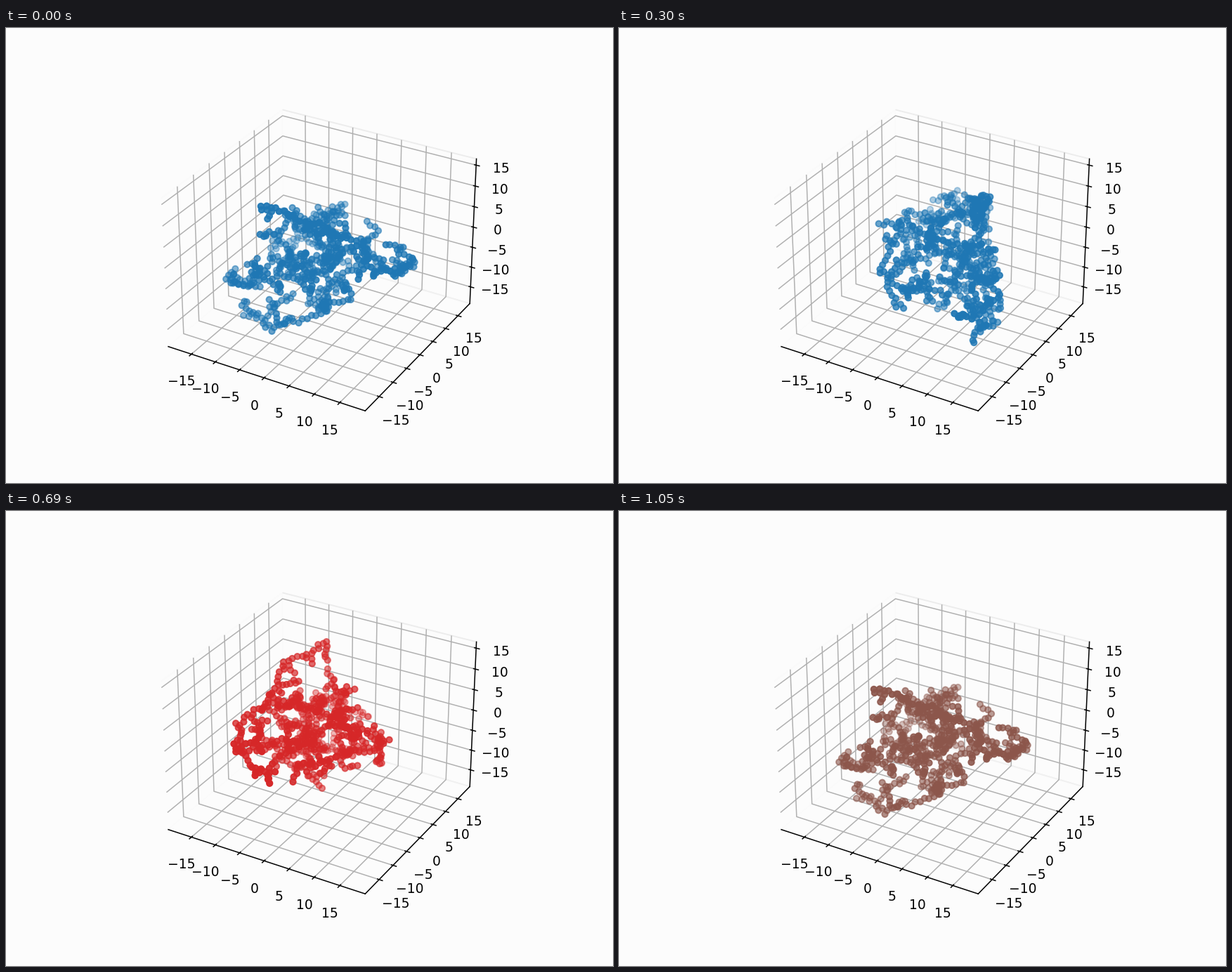
A matplotlib script for the animation above (1.08 s loop, 864 by 648 pixels).

```python
import matplotlib.pyplot as plt
import numpy as np
from matplotlib.animation import ArtistAnimation

FRAMES, LOOP_MS, COUNT = 36, 1080, 640
BG = "#fcfcfc"

# Ends of the main branches; they span the cluster's hull
TIPS = np.array([
    (-11, -6, 14), (-4, -9, 12), (-17, -2, -6), (16, 0, -4),
    (-9, -10, -14), (-14, -4, -14), (1, -9, -10), (9, -12, 1),
    (-5, 11, -1), (-6, 8, -9), (0, 0, -15), (16, -7, 3),
    (-14, -9, -3), (5, -8, 8), (4, 9, 5), (-5, 2, 9),
])


def unit(v):
    return v / np.linalg.norm(v)


def branch(points, target, rng):
    """Walk in jittered unit steps from the nearest point to the target."""
    dist = np.linalg.norm(np.array(points) - target, axis=1)
    pos, gap = points[dist.argmin()], dist.min()
    if gap < 1.4:
        return
    while gap > 1:
        pos = pos + unit(unit(target - pos) + rng.normal(0, 0.4, 3))
        points.append(pos)
        gap = np.linalg.norm(target - pos)


def grow(rng):
    points = [np.zeros(3)]
    for tip in sorted(TIPS, key=np.linalg.norm):
        branch(points, tip, rng)
    while len(points) < COUNT:
        corners = TIPS[rng.choice(len(TIPS), 3, replace=False)]
        branch(points, rng.dirichlet([0.8] * 3) @ corners, rng)
    return np.array(points)


def turn(points, angle):
    x, y, z = points.T
    c, s = np.cos(angle), np.sin(angle)
    return x * c - y * s, x * s + y * c, z


fig = plt.figure(figsize=(6.4, 4.8), dpi=135, facecolor=BG)
ax = fig.add_subplot(projection="3d", facecolor=BG)

cluster = grow(np.random.default_rng(12))
angles = np.radians(30) + np.linspace(0, 2 * np.pi, FRAMES)
artists = [[ax.scatter(*turn(cluster, a), color=f"C{i % 10}")]
           for i, a in enumerate(angles)]

ax.set(xlim=(-19.9, 19.9), ylim=(-19.9, 19.9), zlim=(-19.28, 16.48))
for axis, edge in ((ax.xaxis, "#fafafa"), (ax.yaxis, "#ececec"),
                   (ax.zaxis, "#f1f1f1")):
    axis.set_pane_color((0.988, 0.988, 0.988, 1))
    axis.pane.set_edgecolor(edge)

anim = ArtistAnimation(fig, artists, interval=LOOP_MS / FRAMES,
                       repeat=True, repeat_delay=0)
plt.show()
```
